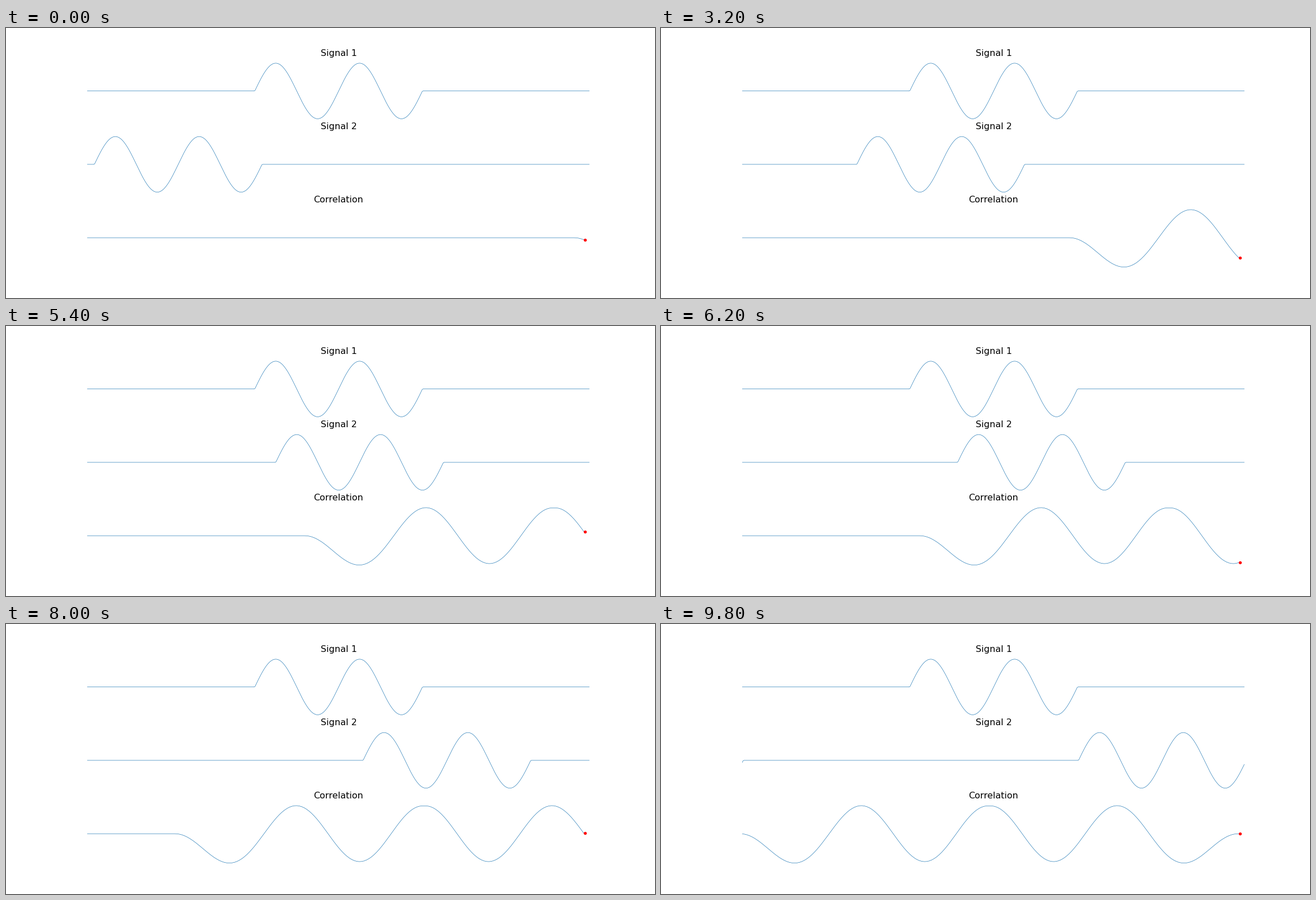
Write a matplotlib script that moves like this. It is 1159 px wide and 483 px high and loops after 10 s.

```python
import numpy as np
import matplotlib.pyplot as plt
from matplotlib.animation import FuncAnimation

FRAMES, INTERVAL, DPI = 50, 200, 96
SAMPLES = 599
STEP = 8                   # samples the second signal moves per frame
HISTORY = 200              # correlation values kept on screen
PER_FRAME = HISTORY // FRAMES

# Two sine cycles between x = 1 and x = 2, silence elsewhere.
x = np.arange(SAMPLES) * 3 / SAMPLES
active = (x > 1) & (x < 2)
fixed = np.where(active, np.sin(4 * np.pi * x), 0)
burst = fixed[active]
moving = np.roll(fixed, 1 - np.argmax(active))

# Mean product over the overlapping samples, sampled at every second shift.
overlap = np.correlate(np.ones_like(burst), np.ones_like(burst), "full")
mean_product = 2 * np.correlate(burst, burst, "full") / overlap
correlation = np.append(mean_product[1::2], 0)

fig, axes = plt.subplots(3, 1, figsize=(1159 / DPI, 483 / DPI), dpi=DPI)
for ax, title in zip(axes, ("Signal 1", "Signal 2", "Correlation")):
    ax.set_title(title, fontsize=12, fontfamily="DejaVu Sans")
    ax.set_xlim(0, SAMPLES)
    ax.set_ylim(-1.1, 1.1)
    ax.axis("off")
axes[2].set_xlim(0, 1)

style = dict(color="tab:blue", linewidth=0.5)
axes[0].plot(fixed, **style)
moving_line, = axes[1].plot(moving, **style)
history_line, = axes[2].plot(np.linspace(0, 0.9875, HISTORY),
                             np.zeros(HISTORY), **style)
dot, = axes[2].plot([0.99], [0], "r.")


def update(frame):
    count = PER_FRAME * (frame + 1)
    history = np.zeros(HISTORY)
    history[HISTORY - count:] = correlation[:count]
    moving_line.set_ydata(np.roll(moving, STEP * (frame + 1)))
    history_line.set_ydata(history)
    dot.set_ydata([history[-1]])
    return moving_line, history_line, dot


anim = FuncAnimation(fig, update, frames=FRAMES, interval=INTERVAL,
                     repeat=True, repeat_delay=0)
plt.show()
```
